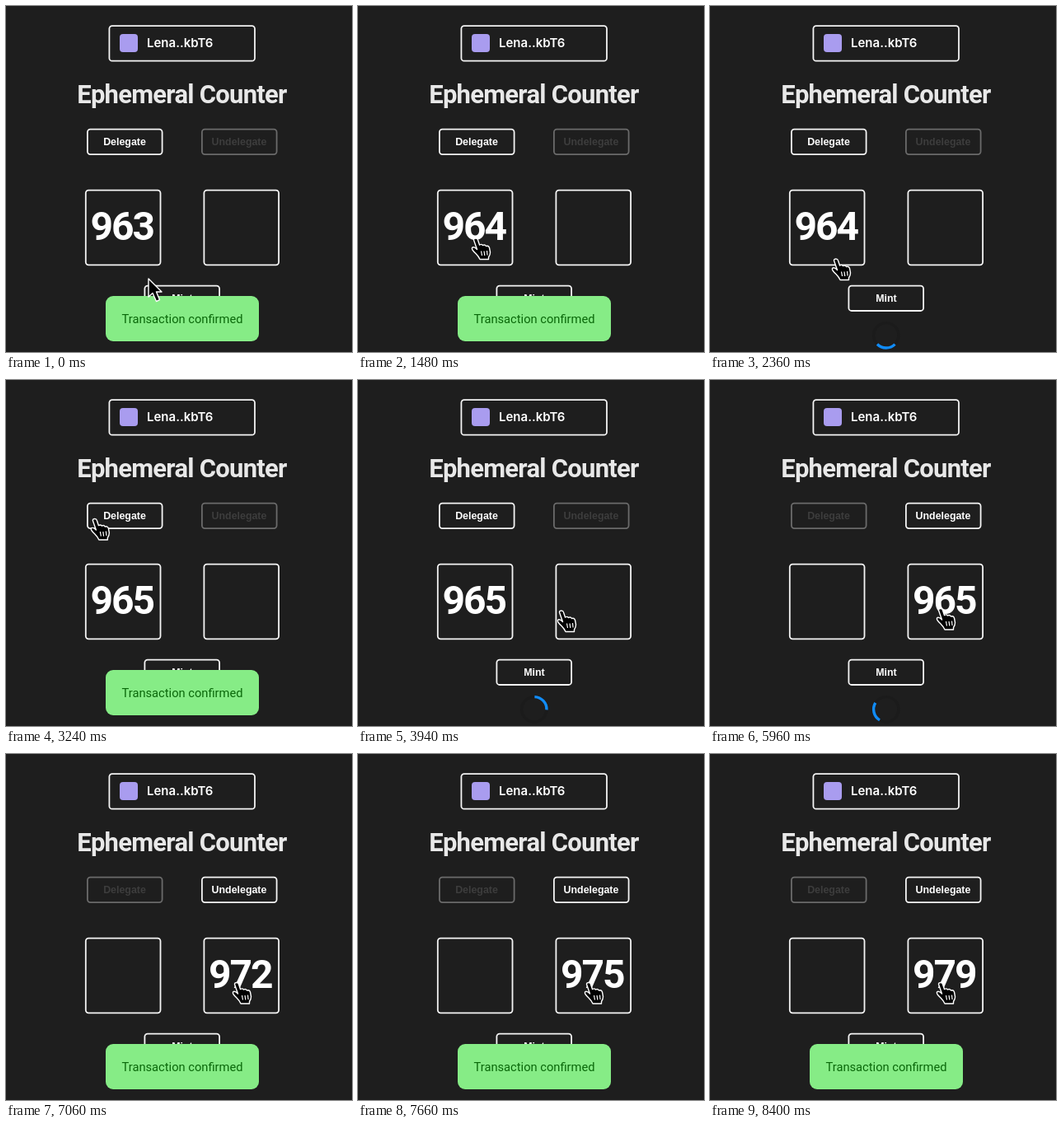
An HTML page that plays this animation: 420 by 420 pixels, repeating every 8420 ms.

```html
<!DOCTYPE html>
<html lang="en">
<head>
<meta charset="utf-8">
<title>Ephemeral Counter</title>
<style>
  html, body { margin: 0; width: 100%; height: 100%; overflow: hidden; background: #1e1e1e; }
  svg { display: block; width: 100vw; height: 100vh; }
  text { text-anchor: middle; fill: #fff; }
  .frame { fill: #1e1e1e; stroke: #f4f4f4; stroke-width: 1.8; }
  .wallet { font: 600 15px Inter, sans-serif; text-anchor: start; }
  .title { font: 600 31px Roboto, sans-serif; letter-spacing: -.75px; fill: #e8e8e8; }
  .label { font: bold 12.4px "Liberation Sans", Arial, sans-serif; }
  .count { font: bold 48px Roboto, sans-serif; letter-spacing: -2px; }
  .note { font: 14.7px Roboto, sans-serif; fill: #0a680a; }
  .off .frame { stroke: #6a6a6a; }
  .off text { fill: #3d3d3d; }
  .cursor { fill: #000; stroke: #fff; stroke-width: 1.4; stroke-linejoin: round; }
</style>
</head>
<body>
<svg viewBox="0 0 420 420">
  <rect class="frame" x="125.4" y="24.1" width="176.6" height="42.6" rx="3.5"/>
  <rect x="138" y="34" width="22" height="22" rx="4" fill="#a99cef"/>
  <text class="wallet" x="171" y="50">Lena..kbT6</text>
  <text class="title" x="213.4" y="118.3">Ephemeral Counter</text>

  <g id="delegate">
    <rect class="frame" x="98.9" y="149.7" width="90.7" height="30.4" rx="3.5"/>
    <text class="label" x="144" y="169">Delegate</text>
  </g>
  <g id="undelegate">
    <rect class="frame" x="237.9" y="149.7" width="90.7" height="30.4" rx="3.5"/>
    <text class="label" x="283" y="169">Undelegate</text>
  </g>

  <rect class="frame" x="96.8" y="223.6" width="90.7" height="90.7" rx="3.5"/>
  <rect class="frame" x="240.4" y="223.6" width="90.7" height="90.7" rx="3.5"/>
  <text class="count" id="left" x="140.7" y="283.7"></text>
  <text class="count" id="right" x="284.3" y="283.7"></text>

  <rect class="frame" x="168.4" y="339.6" width="90.7" height="30.4" rx="3.5"/>
  <text class="label" x="214" y="358.8">Mint</text>

  <g id="spinner" fill="none" stroke-width="3.4">
    <circle cx="213.8" cy="399.8" r="15.2" stroke="#1b1b1b"/>
    <path id="arc" d="M203.05 389.05A15.2 15.2 0 0 1 224.55 389.05" stroke="#118cf8"/>
  </g>

  <g id="toast">
    <rect x="121" y="352" width="186" height="55" rx="9" fill="#86ec86"/>
    <text class="note" x="214" y="385">Transaction confirmed</text>
  </g>

  <path id="arrow" class="cursor" d="M0 0V22L5 17.5 9.5 27.5 13.5 25.7 9.5 16H16Z"/>
  <g id="hand" class="cursor">
    <path d="M-2.5 0Q-2.5-2 0-2 2-2 2.5 0L4.5 6Q7 4.5 8.5 6.5 11 5 12.5 7.5 15.5 6.5 16.5 9.5L17.5 15Q17.5 18 15.5 21V23.5H5Q3.5 20 0 16.5-5.5 11.5-4.5 9.5-2.5 7.5 1.5 11.5Z"/>
    <path d="M6.5 13.5l1 5.5M10 13.5l.8 5.5M13.5 13l.6 5.5" stroke-width="1.2"/>
  </g>
</svg>
<script>
const LOOP = 8420, DELEGATED = 4600, TAPS = 6090;
const el = id => document.getElementById(id);
const show = (id, on) => el(id).style.display = on ? '' : 'none';

// Each pending spell: click time, confirmation time
const pending = [[130, 940], [1860, 2650], [3810, 4600], [5250, TAPS]];

// Pointer tip: time, x, y
const path = [
  [0, 173, 331], [120, 148, 288], [1480, 143, 284], [1860, 143, 284],
  [2360, 153, 309], [2600, 152, 300], [3200, 106, 171], [3420, 126, 166],
  [3680, 132, 166], [3940, 247, 282], [4300, 280, 279.5], [LOOP, 280, 279.5]
];

// Clickable areas: x, y, width, height
const areas = [[98, 149, 92, 32], [96, 223, 92, 92], [240, 223, 92, 92], [168, 339, 92, 32]];

function pointer(t) {
  const i = path.findIndex(p => p[0] > t);
  const [t0, x0, y0] = path[i - 1], [t1, x1, y1] = path[i];
  const k = (t - t0) / (t1 - t0), e = k * k * (3 - 2 * k);
  return [x0 + (x1 - x0) * e, y0 + (y1 - y0) * e];
}

// Value on the counter and time since it last rose
function counter(t) {
  if (t < TAPS) return [t < 940 ? 963 : t < 2650 ? 964 : 965, LOOP];
  const slow = TAPS + 6 * 155;
  const [from, start, step] = t < slow ? [966, TAPS, 155] : [972, slow, 190];
  return [from + Math.floor((t - start) / step), (t - start) % step];
}

function draw(t) {
  const delegated = t >= DELEGATED;
  const [value, age] = counter(t);
  el('delegate').classList.toggle('off', delegated);
  el('undelegate').classList.toggle('off', !delegated);
  el('left').textContent = delegated ? '' : value;
  el('right').textContent = delegated ? value : '';

  const wait = pending.find(([a, b]) => t >= a && t < b);
  show('spinner', wait);
  show('toast', !wait);
  if (wait) el('arc').setAttribute('transform', `rotate(${(t - wait[0]) * .36} 213.8 399.8)`);
  el('toast').setAttribute('transform', `translate(0 ${5 * Math.max(0, 1 - age / 40)})`);

  const [x, y] = pointer(t);
  const over = areas.some(([l, u, w, h]) => x > l && x < l + w && y > u && y < u + h);
  show('hand', over);
  show('arrow', !over);
  el(over ? 'hand' : 'arrow').setAttribute('transform', `translate(${x} ${y})`);
}

const begin = performance.now();
function tick() {
  draw((performance.now() - begin) % LOOP);
  requestAnimationFrame(tick);
}
tick();
</script>
</body>
</html>
```
